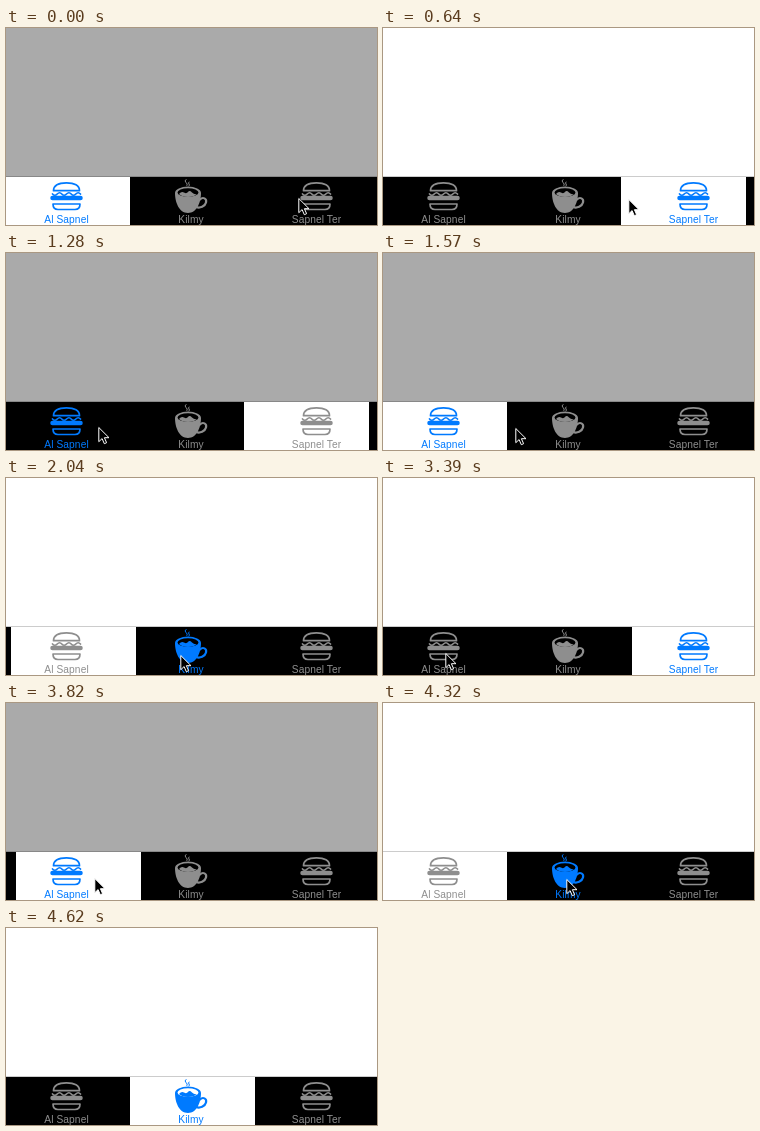
Write an HTML page that moves like this. It is 371 px wide and 197 px high and loops after 5.14 s.

```html
<!DOCTYPE html>
<html lang="en">
<head>
<meta charset="utf-8">
<title>Tab bar</title>
<style>
html, body { margin: 0; width: 100%; height: 100%; overflow: hidden; background: #000; }
svg { display: block; width: 100%; height: 100%; }
text { font: 10.2px "Liberation Sans", Arial, sans-serif; letter-spacing: .1px; text-anchor: middle; stroke: none; }
.tab { color: #8e8e8e; fill: currentColor; stroke: currentColor; }
.tab.on { color: #007aff; }
.line { fill: none; stroke-width: 1.7; stroke-linecap: round; stroke-linejoin: round; }
</style>
</head>
<body>
<svg viewBox="0 0 371 197">
  <defs>
    <g id="burger" class="line">
      <path d="M-13 162.7C-13 157.500-8 154.800 0 154.800S13 157.500 13 162.700Z"/>
      <path d="M-14 166q2.300 2.500 4.700 0t4.600 0 4.700 0 4.700 0 4.600 0 4.700 0"/>
      <path d="M-14 170H14" stroke-width="4.500"/>
      <path d="M-13.500 176H13.500C13.500 180 11.500 181.500 8.500 181.500H-8.500C-11.500 181.500-13.500 180-13.500 176Z"/>
    </g>
    <g id="cup">
      <path stroke="none" fill-rule="evenodd" d="M-16 165A13 6.500 0 0 1 10 165C10 174 6 185-3 185S-16 174-16 165ZM-13.500 164.500A10.500 4.300 0 0 0 7.500 164.500A10.500 4.300 0 0 0-13.500 164.500Z"/>
      <path stroke="none" d="M-12 166q2.500-3 5-1.500t4-.5 4 .5 5 1.500q-3 3-9 3t-9-3Z"/>
      <path class="line" style="stroke-width:2.200" d="M9 171.500C12 168.500 16 170.500 15 174.500S9 180.500 5 179"/>
      <path class="line" style="stroke-width:1" d="M-5 151.500q-2 1.500 0 3t1 3M-2 154q-1 1 0 2t0 2"/>
    </g>
  </defs>
  <rect id="page" width="371" height="149"/>
  <rect y="148" width="371" height="1" fill-opacity=".2"/>
  <rect y="149" width="371" height="48"/>
  <rect id="mark" y="149" width="125" height="48" fill="#fff"/>
  <g class="tab" transform="translate(60.500)"><use href="#burger"/><text y="194.500">Al Sapnel</text></g>
  <g class="tab" transform="translate(185)"><use href="#cup"/><text y="194.500">Kilmy</text></g>
  <g class="tab" transform="translate(310.500)"><use href="#burger"/><text y="194.500">Sapnel Ter</text></g>
  <path id="cursor" stroke="#fff" d="M.8 .5V14.700L4.100 11.600 6.300 16.700 8.600 15.700 6.400 10.700H11Z"/>
</svg>
<script>
const LOOP = 5140, SLIDE = 290;
const $ = id => document.getElementById(id);
const tabs = document.querySelectorAll('.tab');

// Each tap picks a tab; the cursor then glides to (x, y) by the time `rest`.
// `lead` is how far the slide has run when it first shows.
const taps = [
  { at: -600, lead: 0, tab: 0, rest: 0, x: 292, y: 170 },
  { at: 390, lead: 3, tab: 2, rest: 980, x: 92, y: 174 },
  { at: 1280, lead: 36, tab: 0, rest: 1770, x: 174, y: 177 },
  { at: 2040, lead: 36, tab: 1, rest: 2340, x: 276, y: 177 },
  { at: 2740, lead: 3, tab: 2, rest: 3370, x: 62, y: 175 },
  { at: 3570, lead: 3, tab: 0, rest: 4180, x: 183, y: 176 },
  { at: 4320, lead: 3, tab: 1, rest: 4600, x: 186, y: 200 }
];

const clamp = u => Math.min(1, Math.max(0, u));
const smooth = u => u * u * (3 - 2 * u);
const mix = (a, b, u) => a + (b - a) * u;

function draw(t) {
  const i = taps.findLastIndex(tap => tap.at <= t);
  const now = taps[i], last = taps[i - 1] || now;

  const slide = smooth(clamp((t - now.at + now.lead) / SLIDE));
  $('mark').setAttribute('x', Math.round(mix(last.tab, now.tab, slide) * 125 - 1));
  $('page').setAttribute('fill', now.tab ? '#fff' : '#aaa');
  tabs.forEach((tab, n) => tab.classList.toggle('on', n === now.tab));

  const glide = smooth(clamp((t - now.at) / (now.rest - now.at)) ** 1.35);
  const x = Math.round(mix(last.x, now.x, glide));
  const y = Math.round(mix(last.y, now.y, glide));
  $('cursor').setAttribute('transform', `translate(${x} ${y})`);
}

const begin = performance.now();
function tick() {
  draw((performance.now() - begin) % LOOP);
  requestAnimationFrame(tick);
}
tick();
</script>
</body>
</html>
```
